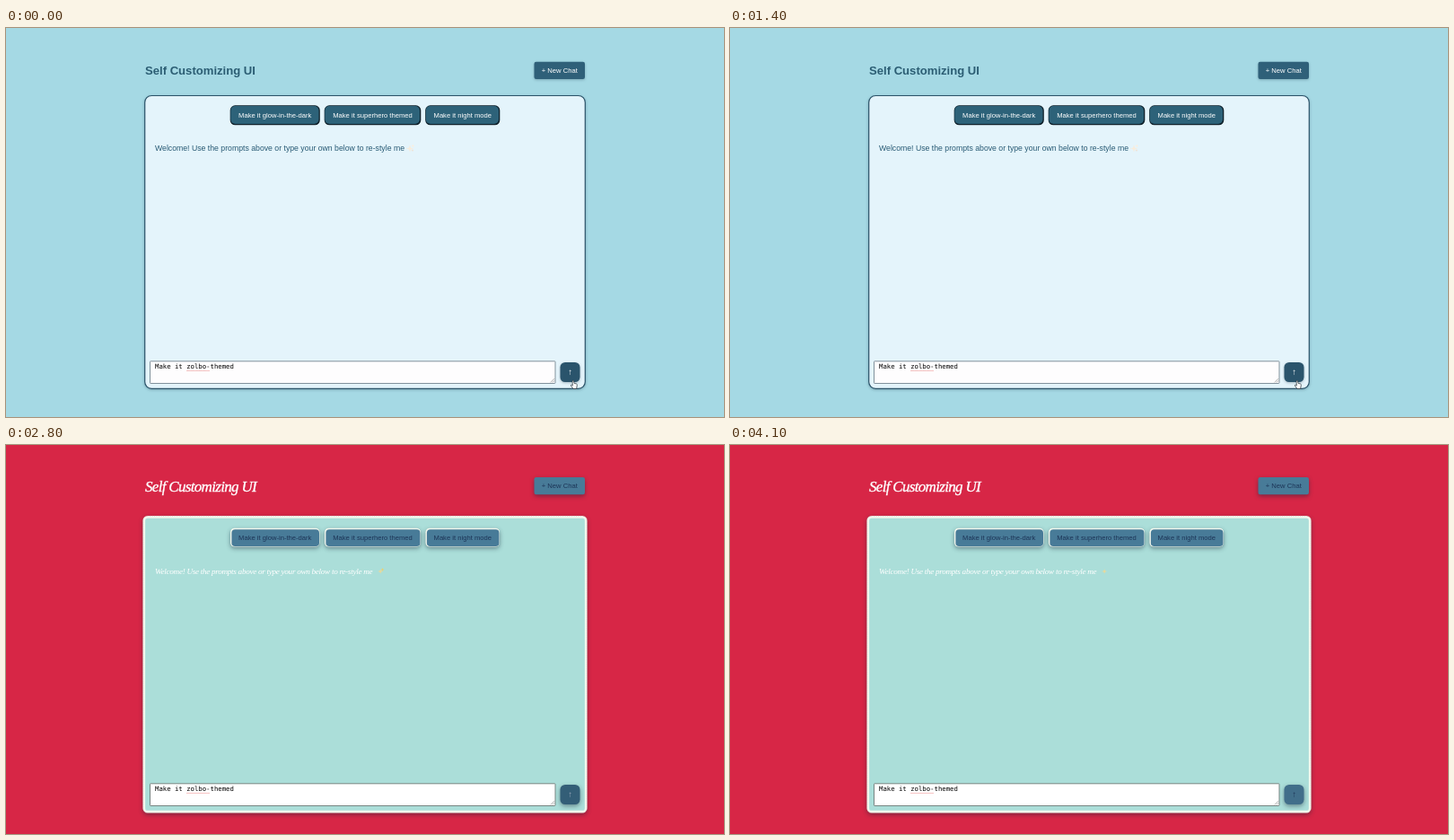
An HTML page for the animation above (4600 ms loop, 800 by 434 pixels).

```html
<!DOCTYPE html>
<html lang="en">
<head>
<meta charset="utf-8">
<title>Self Customizing UI</title>
<style>
  html, body { margin: 0; width: 100%; height: 100%; overflow: hidden; }
  svg { display: block; width: 800px; height: 434px; }
  text { white-space: pre; }
  .sans { font-family: "Liberation Sans", Arial, sans-serif; }
  .mono { font-family: "DejaVu Sans Mono", monospace; font-size: 7.31px; }
  .script { font-family: "Liberation Serif", serif; font-style: italic; }
  .button { font-size: 7.64px; text-anchor: middle; }
  .soft { filter: drop-shadow(0 1.5px 1.5px rgba(20, 45, 65, .3)); }
  .deep { filter: drop-shadow(0 2px 2.5px rgba(20, 30, 50, .45)); }
</style>
</head>
<body>
<svg id="stage" viewBox="0 0 800 434" xmlns="http://www.w3.org/2000/svg"></svg>
<script>
const LOOP = 4600, RESTYLE = 2800, POINTER_END = 1600, SPARKLE_END = 3400;
const stage = document.getElementById("stage");
const TITLE = "Self Customizing UI";
const WELCOME = "Welcome! Use the prompts above or type your own below to re-style me";
const PROMPTS = [
  ["Make it glow-in-the-dark", 250, 349.5],
  ["Make it superhero themed", 355, 462],
  ["Make it night mode", 467.5, 550]
];

function add(parent, tag, attrs = {}, content = "") {
  const node = document.createElementNS("http://www.w3.org/2000/svg", tag);
  for (const key in attrs) node.setAttribute(key, attrs[key]);
  node.textContent = content;
  return parent.appendChild(node);
}

// Rounded box given by its left, top, right and bottom edges.
function box(parent, left, top, right, bottom, rx, fill, more = {}) {
  return add(parent, "rect", { x: left, y: top, width: right - left, height: bottom - top, rx, fill, ...more });
}

function label(parent, x, y, content, fill, more = {}) {
  return add(parent, "text", { x, y, fill, class: "sans", ...more }, content);
}

function star(parent, x, y, r, fill) {
  const k = r * .25;
  return add(parent, "path", {
    fill,
    d: `M${x} ${y - r}L${x + k} ${y - k}L${x + r} ${y}L${x + k} ${y + k}` +
       `L${x} ${y + r}L${x - k} ${y + k}L${x - r} ${y}L${x - k} ${y - k}Z`
  });
}

function newChat(scene, top, fill, ink, shadow) {
  box(scene, 588.5, top, 645, top + 19.2, 2.2, fill, { class: shadow });
  label(scene, 616.8, top + 12.2, "+ New Chat", ink, { class: "sans button" });
}

function composer(scene, top, paper, frame) {
  box(scene, 160.5, top, 612, top + 24.7, .6, paper, { stroke: frame, "stroke-width": 1 });
  label(scene, 166, top + 8.2, "Make it zolbo-themed", "#000", { class: "mono" });
  add(scene, "path", {
    d: `M201.5 ${top + 10.6}H227.5`, stroke: "#e23b3b", "stroke-width": .9,
    "stroke-dasharray": "1 1", opacity: .7
  });
  add(scene, "path", {
    d: `M606.8 ${top + 23.6}l4.2-4.2M609 ${top + 23.6}l2-2`, stroke: "#777", "stroke-width": .6
  });
}

function sendButton(scene, top, shadow) {
  const face = box(scene, 617.5, top, 639.5, top + 22, 5.5, "#2a546c", { class: shadow });
  const arrow = label(scene, 628.5, top + 14.2, "↑", "#fff", { "font-size": 9.5, "text-anchor": "middle" });
  return { face, arrow };
}

function buildBlue() {
  const scene = add(stage, "g");
  const ink = "#2b5d73";
  box(scene, 0, 0, 800, 434, 0, "#a5d9e4");
  label(scene, 155, 52, TITLE, ink, { "font-size": 13.1, "font-weight": 700 });
  newChat(scene, 37.8, "#2f6079", "#fff", "soft");
  box(scene, 154.7, 75.5, 645.3, 402.3, 7.5, "#e4f4fb", { stroke: "#2b5369", "stroke-width": 1.2, class: "soft" });
  for (const [name, left, right] of PROMPTS) {
    box(scene, left - .3, 86.3, right + .3, 108.3, 5.5, "#0d1e28");
    box(scene, left + .3, 87, right - 1, 107, 5, "#2d6279");
    label(scene, (left + right) / 2, 100, name, "#fff", { class: "sans button" });
  }
  label(scene, 166, 136.5, WELCOME, "#285a74", { "font-size": 8.71 });
  star(scene, 450, 134.5, 4, "#f8ecdc");
  star(scene, 453.3, 131.5, 2, "#fbeedd");
  star(scene, 453, 136.7, 1.6, "#f1dfcd");
  composer(scene, 371.8, "#fefdfe", "#81919c");
  sendButton(scene, 373, "soft");
  const pointer = add(scene, "path", {
    d: "M631 393.6q1-.8 1.6.3l.5 2.5 2.3.5q1.2.4.9 1.7l-.7 3.9h-3.5l-2.7-3.4q-.3-1 .9-.9l1.1.8z",
    fill: "#fff", stroke: "#222b33", "stroke-width": .7, "stroke-linejoin": "round"
  });
  return { scene, pointer };
}

function buildRed() {
  const scene = add(stage, "g");
  const cream = "#f1f7ed", ink = "#1d3557", steel = "#487b98";
  box(scene, 0, 0, 800, 434, 0, "#d72646");
  label(scene, 155, 51.5, TITLE, "#fff", {
    class: "script", "font-size": 17, "letter-spacing": -.68, stroke: "#fff", "stroke-width": .35
  });
  newChat(scene, 36, steel, ink, "deep");
  box(scene, 153.8, 80.4, 646.2, 409.2, 4, "#abded9", { stroke: cream, "stroke-width": 2.7, class: "deep" });
  box(scene, 152.6, 79.2, 647.4, 410.4, 5, "none", {
    stroke: "#d98b95", "stroke-width": .6, "stroke-dasharray": "1 1.5"
  });
  for (const [name, left, right] of PROMPTS) {
    box(scene, left, 92.8, right, 113.5, 4.5, cream, { class: "deep" });
    box(scene, left + 1.4, 94.2, right - .5, 113.1, 3.8, steel);
    label(scene, (left + right) / 2, 106, name, ink, { class: "sans button" });
  }
  label(scene, 166, 143.8, WELCOME, "#fff", { class: "script", "font-size": 9.2, "letter-spacing": -.31 });
  star(scene, 417.2, 141, 2.8, "#ead99a");
  const glint = star(scene, 419.5, 139, 1.9, "#f4cf62");
  composer(scene, 377.8, "#fff", "#768582");
  return { scene, glint, send: sendButton(scene, 379, "deep") };
}

function mix(from, to, p) {
  return `rgb(${from.map((c, i) => Math.round(c + (to[i] - c) * p))})`;
}

const blue = buildBlue(), red = buildRed();
const show = (node, on) => node.setAttribute("display", on ? "inline" : "none");

function render(t) {
  show(blue.scene, t < RESTYLE);
  show(blue.pointer, t < POINTER_END);
  show(red.scene, t >= RESTYLE);
  show(red.glint, t >= RESTYLE && t < SPARKLE_END);
  const p = Math.min(1, Math.max(0, (t - RESTYLE + 120) / 320));
  red.send.face.setAttribute("fill", mix([42, 84, 108], [65, 110, 138], p));
  red.send.arrow.setAttribute("fill", mix([225, 238, 244], [29, 53, 87], p));
}

const start = performance.now();
function tick() {
  render((performance.now() - start) % LOOP);
  requestAnimationFrame(tick);
}
tick();
</script>
</body>
</html>
```
